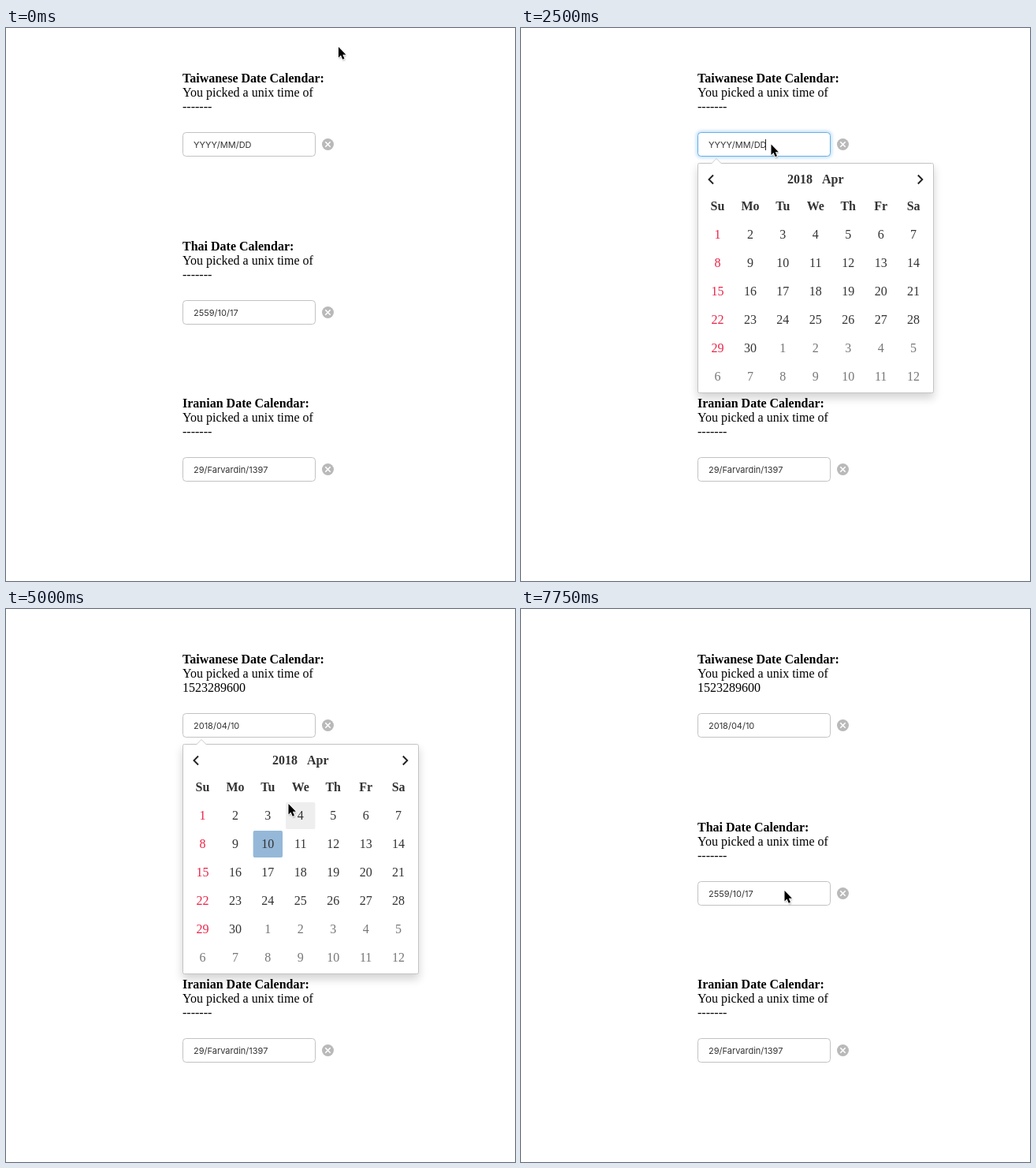
Recreate the animation shown at these times as an HTML page. Size 646 by 701 pixels, loop 8 s.

```html
<!DOCTYPE html>
<html lang="en">
<head>
<meta charset="utf-8">
<title>Date pickers</title>
<style>
  html, body { margin: 0; width: 100%; height: 100%; overflow: hidden; background: #fff; }
  svg { display: block; width: 646px; height: 701px; }
  text { font: 16px "Liberation Serif", "Times New Roman", serif; fill: #000; }
  .bold { font-weight: bold; }
  .field { font: 11px Inter, "Open Sans", sans-serif; fill: #333; }
  .cal { fill: #333; }
  .mid { text-anchor: middle; }
  .sunday { fill: #ea2447; }
  .outside { fill: #777; }
</style>
</head>
<body>
<svg id="stage" viewBox="0 0 646 701" xmlns="http://www.w3.org/2000/svg">
  <defs>
    <filter id="soft" x="-20%" y="-20%" width="140%" height="140%"><feGaussianBlur stdDeviation="6"/></filter>
    <filter id="glow" x="-10%" y="-50%" width="120%" height="200%"><feGaussianBlur stdDeviation="2"/></filter>
    <filter id="blur" x="-50%" y="-50%" width="200%" height="200%"><feGaussianBlur stdDeviation="1"/></filter>
    <path id="arrow" d="M0 0V13.4L3 10.6L5.2 15.7L7.5 14.7L5.3 9.7H9.4Z"/>
  </defs>
</svg>
<script>
const NS = 'http://www.w3.org/2000/svg';
const LOOP = 8000;
const COL = 41.43, ROW = 36;
const stage = document.getElementById('stage');

function add(parent, tag, attrs, content) {
  const el = document.createElementNS(NS, tag);
  for (const key in attrs) el.setAttribute(key, attrs[key]);
  if (content !== undefined) el.textContent = content;
  parent.appendChild(el);
  return el;
}

function show(el, on) {
  el.setAttribute('visibility', on ? 'visible' : 'hidden');
}

// One titled date field with its clear button
function picker(name, y, value) {
  const g = add(stage, 'g', { transform: `translate(0 ${y})` });
  add(g, 'text', { x: 224, y: 69, class: 'bold' }, `${name} Date Calendar:`);
  add(g, 'text', { x: 224, y: 87 }, 'You picked a unix time of');
  const stamp = add(g, 'text', { x: 224, y: 105 }, '-------');
  const box = { x: 224.5, y: 132.5, width: 168, height: 30, rx: 4 };
  const glow = add(g, 'rect', { ...box, fill: 'none', stroke: '#66afe9', 'stroke-width': 3, opacity: .6, filter: 'url(#glow)' });
  const frame = add(g, 'rect', { ...box, fill: '#fff' });
  const input = add(g, 'text', { x: 238, y: 152, class: 'field' }, value);
  add(g, 'circle', { cx: 408.5, cy: 147.5, r: 7.5, fill: '#b9b9b9' });
  add(g, 'path', { d: 'M405.3 144.3l6.4 6.4m0-6.4l-6.4 6.4', stroke: '#fff', 'stroke-width': 1.6 });
  return { stamp, glow, frame, input };
}

const pickers = [
  picker('Taiwanese', 0, 'YYYY/MM/DD'),
  picker('Thai', 213, '2559/10/17'),
  picker('Iranian', 412, '29/Farvardin/1397')
];
for (const p of pickers) {
  p.frame.setAttribute('stroke', '#c2c2c2');
  show(p.glow, false);
}
const active = pickers[0];
const caret = add(stage, 'rect', { x: 310, y: 141, width: 1, height: 14, fill: '#222' });

// Calendar popup
const popup = add(stage, 'g', {});
add(popup, 'rect', { x: 224, y: 177, width: 300, height: 292, fill: '#000', opacity: .175, filter: 'url(#soft)' });
add(popup, 'rect', { x: 224.5, y: 171.5, width: 299, height: 291, rx: 2, fill: '#fff', stroke: '#c4c4c4' });
add(popup, 'path', { d: 'M241.5 172L248 165.5L254.5 172', fill: '#fff', stroke: '#ccc' });

const cellX = col => 249.5 + col * COL;
const cellY = row => 262 + row * ROW;
function shade(x, y, width, fill) {
  return add(popup, 'rect', { x: x - width / 2, y: y - 17, width, height: 34, rx: 2, fill });
}
const shades = {
  four: shade(cellX(3), cellY(0), 37.4, '#eee'),
  ten: shade(cellX(2), cellY(1), 37.4, '#eee'),
  month: shade(395.5, 192, 39, '#eee')
};
const picked = shade(cellX(2), cellY(1), 37.4, '#95b8d8');

add(popup, 'path', { d: 'M244 186.5L238.5 192L244 197.5M503.8 186.5L509.3 192L503.8 197.5', fill: 'none', stroke: '#222', 'stroke-width': 1.9 });
add(popup, 'text', { x: 338, y: 197, class: 'cal bold' }, '2018');
add(popup, 'text', { x: 382, y: 197, class: 'cal bold' }, 'Apr');
['Su', 'Mo', 'Tu', 'We', 'Th', 'Fr', 'Sa'].forEach((day, col) =>
  add(popup, 'text', { x: cellX(col), y: 231, class: 'cal bold mid' }, day));
for (let i = 0; i < 42; i++) {
  const col = i % 7;
  const kind = i >= 30 ? 'outside' : col === 0 ? 'sunday' : 'cal';
  add(popup, 'text', { x: cellX(col), y: cellY(Math.floor(i / 7)) + 5, class: `mid ${kind}` }, i % 30 + 1);
}

// Mouse pointer
const pointer = add(stage, 'g', {});
add(pointer, 'use', { href: '#arrow', x: .8, y: 1.8, opacity: .4, filter: 'url(#blur)' });
add(pointer, 'use', { href: '#arrow', stroke: '#fff', 'stroke-width': 1.8, 'stroke-linejoin': 'round' });
add(pointer, 'use', { href: '#arrow' });

// Pointer stops: time, x, y; each is held until the next
const stops = [
  [0, 422, 24], [250, 397, 56], [500, 343, 110.5], [750, 319, 143],
  [1000, 319.5, 144.5], [1500, 314.5, 150], [2000, 326, 149], [2250, 318, 149],
  [2500, 317.5, 147.5], [3000, 321, 226.5], [3250, 324, 278.5], [3500, 358, 268],
  [3750, 331, 284.5], [4000, 332, 289], [5000, 358.5, 247], [5250, 360, 243.5],
  [5500, 394, 200.5], [5750, 450.5, 148], [6000, 454.5, 143.5],
  [7500, 338, 354], [7750, 334.5, 357]
];

function render(t) {
  const within = (from, to) => t >= from && t < to;
  const [, x, y] = stops.filter(s => s[0] <= t).pop();
  pointer.setAttribute('transform', `translate(${x} ${y})`);

  const focused = within(2500, 4500);
  const chosen = t >= 4500;
  show(active.glow, focused);
  active.frame.setAttribute('stroke', focused ? '#66afe9' : '#c2c2c2');
  active.stamp.textContent = chosen ? '1523289600' : '-------';
  active.input.textContent = chosen ? '2018/04/10' : 'YYYY/MM/DD';
  show(caret, within(2500, 3000) || within(3500, 4000));

  popup.setAttribute('display', within(2500, 6750) ? 'inline' : 'none');
  show(shades.four, within(3500, 3750) || within(5000, 5250));
  show(shades.ten, within(4000, 5000));
  show(shades.month, within(5500, 5750));
  show(picked, t >= 5000);
}

const start = performance.now();
function tick() {
  render((performance.now() - start) % LOOP);
  requestAnimationFrame(tick);
}
tick();
</script>
</body>
</html>
```
